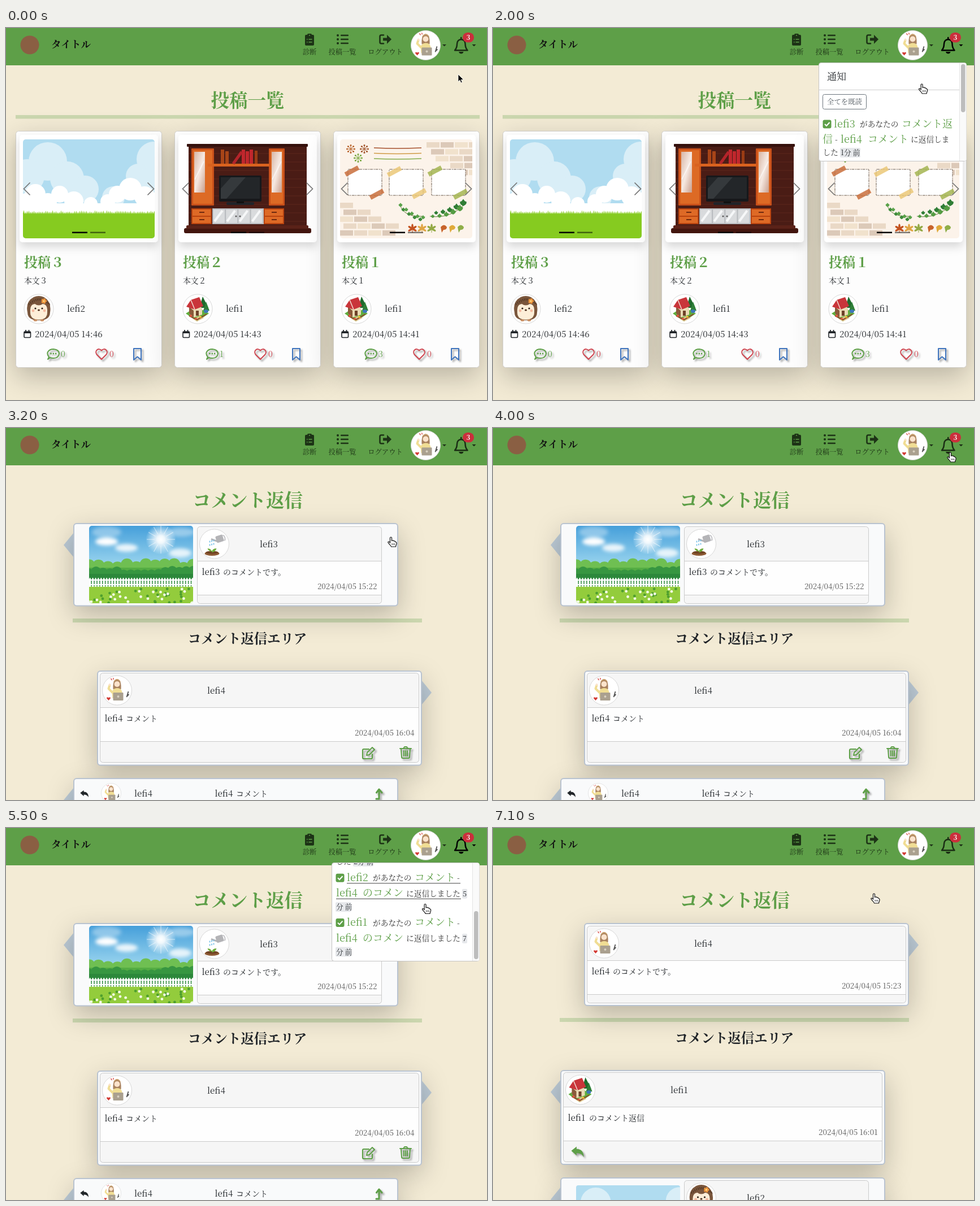
These frames come from a looping animation (851 by 658 pixels, 7.2 s). An HTML page:

```html
<!DOCTYPE html>
<html lang="ja">
<head>
<meta charset="utf-8">
<style>
html, body { margin: 0; width: 100%; height: 100%; overflow: hidden; background: #f3ebd5; }
svg { display: block; width: 100vw; height: 100vh; }
text { font-family: 'Noto Serif CJK JP', 'Noto Serif JP', 'Noto Serif', 'Noto Sans CJK JP', serif; white-space: pre; }
.lift { filter: drop-shadow(0 16px 24px rgba(0,0,0,.24)); }
.float { filter: drop-shadow(0 8px 8px rgba(0,0,0,.15)); }
.icon { filter: drop-shadow(3px 3px 1.5px rgba(0,0,0,.35)); }
</style>
</head>
<body>
<svg id="stage" viewBox="0 0 851 658"></svg>
<script>
const GREEN = '#5e9f48', INK = '#212529', NAV = '#1d3316';
const user = n => 'lefi' + n;

let seed = 7;
const rnd = () => (seed = (seed * 16807) % 2147483647) / 2147483647;
const rep = (n, f) => Array.from({ length: n }, (_, i) => f(i)).join('');

const T = (x, y, s, size, fill = INK, weight = 400, anchor = 'start') =>
  `<text x="${x}" y="${y}" font-size="${size}" fill="${fill}" font-weight="${weight}" text-anchor="${anchor}">${s}</text>`;
const R = (x, y, w, h, fill, r = 0, more = '') =>
  `<rect x="${x}" y="${y}" width="${w}" height="${h}" rx="${r}" fill="${fill}" ${more}/>`;
const E = (x, y, rx, ry, fill, more = '') =>
  `<ellipse cx="${x}" cy="${y}" rx="${rx}" ry="${ry}" fill="${fill}" ${more}/>`;
const C = (x, y, r, fill, more) => E(x, y, r, r, fill, more);
const P = (d, fill, more = '') => `<path d="${d}" fill="${fill}" ${more}/>`;
const L = (d, color, w = 1, more = '') => P(d, 'none', `stroke="${color}" stroke-width="${w}" ${more}`);
const G = (s, more = '') => `<g ${more}>${s}</g>`;
const at = (x, y, s, k = 1) => G(s, `transform="translate(${x} ${y}) scale(${k})"`);
const round = 'stroke-linecap="round" stroke-linejoin="round"';
const clip = (id, x, y, w, h, r) => `<clipPath id="${id}">${R(x, y, w, h, '#000', r)}</clipPath>`;
const stop = (o, c, a = 1) => `<stop offset="${o}" stop-color="${c}" stop-opacity="${a}"/>`;

const defs = `<defs>
${clip('photo', 30, 197, 233, 175, 5)}${clip('paper', 591, 197, 234, 175, 5)}
${clip('garden', 147, 173, 184, 137, 5)}${clip('list', 577, 62, 248, 173, 3)}
<linearGradient id="air" x2="0" y2="1">${stop(0, '#459fda')}${stop(.6, '#a9def2')}</linearGradient>
<linearGradient id="glass" x2="1" y2="1">${stop(0, '#d7b5a5')}${stop(.5, '#f6e9e2')}${stop(1, '#c99f8d')}</linearGradient>
<radialGradient id="sun">${stop(0, '#fff')}${stop(.25, '#fff', .9)}${stop(1, '#fff', 0)}</radialGradient>
<filter id="soft"><feGaussianBlur stdDeviation="3"/></filter></defs>`;

// Avatars, centred on 0,0 with radius 26
const faces = {
  desk: P('M-7-2Q-8-19 0-20Q8-19 7-2Z', '#a9825f') + C(0, -11, 5, '#fbe3cc') +
    P('M-6-14Q0-22 6-14L6-16Q0-24-6-16Z', '#c9a06e') +
    P('M-8 14L-9 2Q-6-4 0-4Q8-4 9 4L9 14Z', '#f0dd94') + L('M-8 4L-15-3L-13-9', '#f0dd94', 4, round) +
    C(-13, -10, 2, '#fbe3cc') + R(-7, 4, 18, 14, '#aaa08f', 1) + C(2, 11, 2, '#d8d0c0') +
    P('M-15 18l-3.5-4q0-3 3.5-1q3.5-2 3.5 1z', '#d33a34') + L('M-11-21l2 3M-7-22l1 3', '#d9534f', 1.4) +
    L('M17 12L20 2M18 10l3-3', '#555', 1.8),
  hedgehog: P('M-20 6Q-24-13-9-21Q0-25 9-21Q23-13 20 6Q20 20 0 20Q-20 20-20 6Z', '#7a563c') +
    rep(13, i => L(`M${-18 + i * 3} ${-11 - 8 * Math.sin(i / 12 * Math.PI)}l1.5 4`, '#4d3423', 1.2)) +
    P('M-15 4Q-16-8-7-9Q0-4 7-9Q16-8 15 4Q16 19 0 19Q-16 19-15 4Z', '#fdeed8') +
    C(-6, -1, 1.6, '#2c1d14') + C(6, -1, 1.6, '#2c1d14') + E(0, 2, 2, 1.5, '#4a2d1c') +
    C(-10, 3, 2.4, '#f4b9a0') + C(10, 3, 2.4, '#f4b9a0') +
    rep(5, i => C(9 + 3 * Math.cos(i * 1.26), -14 + 3 * Math.sin(i * 1.26), 2, '#f0973d')) + C(9, -14, 1.6, '#ffe28a') +
    E(-6, 20, 3.5, 1.8, '#c98f62') + E(6, 20, 3.5, 1.8, '#c98f62'),
  house: P('M-21 8L-2-4L20 8L-1 22Z', '#5fae3c') + P('M-8 18L4 12L11 16L-1 22Z', '#dfc48c') +
    P('M3-2L9-22L19-2Z', '#1f6b2c') + P('M10 3L15-13L21 3Z', '#2f8038') +
    P('M-15-4L-1-12L8-1L8 10L-7 15L-15 8Z', '#eadbb5') + P('M-15-4L-7 3L-7 15L-15 8Z', '#8a5a3a') +
    P('M-20-4L-12-16L3-21L10-5L-5 1Z', '#c9353a') + L('M-12-16L-5 1', '#f0dcd0', 1.5) +
    R(-3, 3, 5, 9, '#6d4128') + L('M-15 12L-1 19L16 9', '#8a4b2a', 2) + E(15, 4, 4, 3, '#3e77b8') +
    C(-12, 12, 2, '#e7523d') + C(5, 14, 1.8, '#f3c52d') + C(-3, 17, 1.8, '#e7523d'),
  can: E(-4, 17, 13, 4, '#8d5a35') + E(-4, 15, 11, 2.5, '#6f4222') +
    P('M-4 15Q-5 8-12 8Q-10 14-4 13Q-3 8 4 8Q2 14-4 15Z', '#6fae3e') +
    G(R(3, -15, 13, 12, '#b4b4b7', 2) + L('M4-6L-5-13', '#b4b4b7', 3) + L('M15-13Q21-13 18-4L15-4', '#c6c6c9', 2), 'transform="rotate(-18 9 -9)"') +
    rep(6, i => E(-8 + i % 3 * 3.5, -4 + (i > 2) * 6 - i % 3, 1, 1.8, '#7cc3e8'))
};
const avatar = (x, y, kind, r = 26) =>
  at(x, y, C(0, 0, 26, '#fff', 'stroke="#d8d8d8"') + faces[kind], r / 26);

// Pictures
const sky = () => G(
  R(30, 197, 233, 175, '#b0dcf0') +
  [[74, 236, 34], [38, 262, 30], [108, 266, 30], [140, 285, 24], [262, 232, 31], [234, 262, 22], [190, 300, 20], [255, 275, 28]]
    .map(c => C(...c, '#d9eef7')).join('') +
  [[35, 310, 18], [52, 294, 18], [74, 308, 16], [95, 294, 15], [120, 306, 17], [150, 311, 12], [180, 307, 13], [197, 294, 15], [220, 285, 20], [245, 298, 18], [262, 305, 14]]
    .map(c => C(...c, '#fff')).join('') +
  R(30, 310, 233, 30, '#fff') +
  P('M30 372V328' + rep(78, i => `L${31.5 + i * 3} ${322 + rnd() * 4}L${33 + i * 3} 329`) + 'V372Z', '#86cb20'),
  'clip-path="url(#photo)"');

const door = (x, w) => R(x, 213, w, 101, '#c9501a', 1) + R(x + 3, 216, w - 6, 95, '#dd6a25') +
  R(x + 5, 219, Math.min(w - 10, 19), 72, 'url(#glass)') + L(`M${x + 6} 268l16-32`, '#fff', 2, 'opacity=".6"');
const drawers = x => R(x, 319, 36, 28, '#b9430f') +
  rep(2, i => R(x + 2, 321 + 13 * i, 32, 11, '#de6a26') + R(x + 14, 325 + 13 * i, 9, 2, '#6d2a10'));
const cabinet = () =>
  R(323, 208, 209, 146, '#4a1c15') + rep(9, i => L(`M323 ${222 + i * 15}H532`, '#5d261c')) +
  R(320, 205, 214, 5, '#35110d', 1) + R(315, 354, 225, 9, '#43160f', 3) + R(319, 349, 216, 6, '#5a2218', 2) +
  door(328, 40) + door(465, 28) + R(357, 240, 109, 5, '#d9621f') +
  [380, 388, 417, 424, 431].map((x, i) => R(x, 215 + i % 2 * 3, 6, 25 - i % 2 * 3, i < 2 ? '#a84518' : '#c1272d')).join('') +
  L('M402 240L417 219', '#b3242a', 5) + R(440, 217, 5, 23, '#9b3c14') +
  R(390, 308, 49, 5, '#20242a', 2) + R(408, 304, 13, 6, '#111') +
  R(377, 261, 75, 46, '#16181b', 2) + R(380, 264, 69, 38, '#232629') + P('M398 264h26l-34 38h-10v-18z', '#35393c') +
  drawers(328) + drawers(456) + R(365, 319, 91, 28, '#b9bcc0') +
  rep(4, i => R(367 + i * 22.2, 321, 20, 24, '#d9dbdd') + L(`M${369 + i * 22.2} 342l14-19`, '#f6f7f8', 4)) +
  C(407, 333, 1.5, '#555') + C(414, 333, 1.5, '#555');

const brick = (x, y, i) => R(x, y, 23, 9.5, ['#ead9c6', '#dcc9b8', '#f1e2cd'][i % 3]);
const tape = (x, y, a, c) => G(R(-13, -4, 26, 8, c), `transform="translate(${x} ${y}) rotate(${a})" opacity=".85"`);
const leaf = (x, y, c, s = 1) => at(x, y, P('M0 6Q-7 3-6-2L-3-3L0-7L3-3L6-2Q7 3 0 6Z', c), s);
const star = (x, y, c) => rep(5, i => G(E(0, -4, 1.8, 4.5, c), `transform="translate(${x} ${y}) rotate(${i * 60 - 120})"`)) + L(`M${x} ${y}v7`, c, 1);
const bloom = (x, y, c) => rep(8, i => {
  const a = i * Math.PI / 4, u = Math.cos(a), v = Math.sin(a);
  return L(`M${x} ${y}l${u * 7} ${v * 7}`, c) + C(x + u * 6.5, y + v * 6.5, 1.5, c);
});
const paper = () => G(
  R(591, 197, 234, 175, '#fcf3ea') +
  rep(5, r => rep(4, i => brick(744 + r * 8 + (r > 2 ? 18 : 0) + i * 25, 202 + r * 12.2, r + i))) +
  rep(5, r => rep(Math.min(r + 1, 4), i => brick(591 + i * 25 + r % 2 * 6, 309 + r * 12.2, r + i * 2))) +
  bloom(610, 214, '#b9662f') + bloom(634, 214, '#a2552c') + bloom(623, 230, '#79a83f') +
  ['#a5502d', '#d09a45', '#85ad4f'].map((c, i) => L(`M651 ${212 + i * 9.5}q40 2 84 0`, c, 1.4)).join('') +
  [605, 678, 753].map(x => R(x, 250, 60, 46, '#fff', 1, 'stroke="#6b5a4c" stroke-dasharray="5 1.5 2 1"')).join('') +
  tape(612, 253, -28, '#c96f3c') + tape(656, 294, -28, '#c96f3c') + tape(687, 254, -28, '#ecc878') +
  tape(731, 293, -28, '#ecc878') + tape(759, 253, -28, '#a5b552') + tape(804, 294, -28, '#a5b552') +
  L('M697 312Q703 335 738 333', '#5d7a35') + L('M750 333Q785 338 810 313', '#5d7a35') +
  rep(9, i => leaf(698 + i * 5, 313 + 22 * Math.sin(i * .19) + i % 2 * 4, i % 2 ? '#3c8a3a' : '#5aa24a', .55)) +
  rep(10, i => leaf(755 + i * 6, 333 - i * i * .22 - i % 2 * 6, i % 2 ? '#2f7d35' : '#549c43', .5 + i * .05)) +
  star(719, 355, '#c4521f') + star(736, 355, '#e0a544') + star(753, 355, '#93a944') +
  ['#c8642b', '#e0aa3a', '#8fae48'].map((c, i) => P(`M${769 + i * 15} 352q6-7 11 0q0 5-6 5l-3 5z`, c)).join(''),
  'clip-path="url(#paper)"');

const hedge = (y, c, r, n) => rep(n, i => C(147 + i * 184 / (n - 1), y + rnd() * 7, r, c));
const garden = () => G(
  R(147, 173, 184, 137, 'url(#air)') +
  G(E(178, 184, 26, 10, '#fff', 'opacity=".35"') + E(178, 201, 20, 7, '#fff') + E(213, 212, 20, 7, '#fff', 'opacity=".85"') +
    E(308, 221, 20, 8, '#fff', 'opacity=".8"') + E(310, 184, 24, 8, '#fff', 'opacity=".4"'), 'filter="url(#soft)"') +
  C(274, 197, 27, 'url(#sun)') + rep(12, i => L('M0-11V-25', '#fff', 1, `opacity=".6" transform="translate(274 197) rotate(${i * 30})"`)) +
  hedge(241, '#6fbf52', 11, 12) + R(147, 247, 184, 30, '#55ad43') + hedge(253, '#379641', 9, 16) + R(147, 258, 184, 25, '#2c883b') +
  R(147, 280, 184, 30, '#93cc3c') + L('M147 269H331M147 277H331', '#fff', 2) +
  rep(38, i => P(`M${147 + i * 4.9} 281v-14l1.7-2.5l1.7 2.5v14z`, '#fff')) +
  rep(50, i => C(147 + rnd() * 184, 284 + rnd() * 26, 2.4, i % 2 ? '#4f9f2e' : '#f4fbe4')),
  'clip-path="url(#garden)"');

// Icons
const replyIcon = (x, y, c, k) => at(x, y, P('M-11-2L-2-9V-5Q10-5 10 9Q7 2-2 2V6Z', c), k);
const editIcon = (x, y) => G(
  L(`M${x + 1} ${y - 7}h-9q-2 0-2 2v13q0 2 2 2h13q2 0 2-2v-6`, GREEN, 2.2, round) +
  L(`M${x - 3} ${y + 4}l1-5l9-9l4 4l-9 9z`, GREEN, 2, round), 'class="icon"');
const trashIcon = (x, y) => G(
  L(`M${x - 10} ${y - 7}h20M${x - 4} ${y - 7}l2-3h4l2 3M${x - 8} ${y - 6}l1 14q0 2 2 2h10q2 0 2-2l1-14M${x - 3} ${y - 3}v9M${x} ${y - 3}v9M${x + 3} ${y - 3}v9`, GREEN, 2, round), 'class="icon"');
const chevron = (x, dir) => L(`M${x} 273.5l${dir * 11} 11l${-dir * 11} 11`, '#777', 1.7);

const heading = s => T(427.5, 140, s, 32.5, GREEN, 600, 'middle');
const BAR = 'rgba(94,159,72,.27)';

const card = (i, no, who, face, time, replies) => at(281 * i, 0,
  R(17.5, 182.5, 258, 418, '#fdfdfd', 5, 'class="lift"') + R(17.5, 182.5, 258, 418, '#fdfdfd', 5, 'stroke="#cfcdc8"') +
  R(24, 189, 245, 190, '#fff', 5, 'class="float"') +
  T(32, 423, '投稿' + no, 23.6, GREEN, 600) + T(32, 452, '本文' + no, 13.8, INK, 500) +
  avatar(58, 497, face) + T(108, 502, user(who), 15.2) +
  R(32, 537, 11.5, 10.5, 'none', 1.5, `stroke="${INK}" stroke-width="1.6"`) + R(32, 537, 11.5, 3, INK) + L('M35 534v3M40.500 534v3', INK, 1.8) +
  T(51, 546.5, '2024/04/05 14:' + time, 15.2) +
  G(L('M76 582Q72 577 74 573Q77 568 84 568Q94 569 94 576Q93 584 84 584Q80 584 78 583L74 586Z', GREEN, 2, round) +
    rep(3, k => C(79.5 + k * 4.3, 576, 1.4, GREEN)) + T(97, 581.5, replies, 14, GREEN) +
    L('M169 586L160.500 577.500C156 571 164 564.500 169 570.500C174 564.500 182 571 177.500 577.500Z', '#cf4650', 2, round) + T(183, 581.5, 0, 14, '#cf4650') +
    L('M226 567h13v20l-6.500-5.500l-6.500 5.500z', '#3f74bd', 2, round), 'class="icon"'));

const listPage = () => heading('投稿一覧') + R(17, 154, 821, 6.5, BAR) +
  card(0, '３', 2, 'hedgehog', 46, 0) + card(1, '２', 1, 'house', 43, 1) + card(2, '１', 1, 'house', 41, 3) +
  sky() + cabinet() + paper() +
  rep(3, i => at(281 * i, 0, chevron(42.5, -1) + chevron(250.5, 1) + R(117, 360.5, 27, 2.5, '#000') + R(149, 360.5, 27, 2.5, '#000', 0, 'opacity=".5"')));

const box = (x, y, h, side) => {
  const edge = side < 0 ? x : x + 573;
  const rect = more => R(x, y, 573, h, '#f9fafb', 5, more);
  return P(`M${edge + side * 18} ${y + 38}L${edge} ${y + 16}V${y + 60}Z`, '#bccad5') +
    rect('class="lift"') + rect('stroke="#b9c3d0" stroke-width="2"');
};
const say = (x, y, who, s) => T(x, y, user(who), 15.2, INK, 500) + T(x + 37.5, y, s, 14, INK, 500);
const note = (x, y, w, h, face, who, nameX, s, date) =>
  R(x, y, w, h, '#f6f6f6', 5, 'stroke="#cbcbcb"') + R(x, y + 61, w, 60, '#fefefe', 0, 'stroke="#cbcbcb"') +
  avatar(x + 30, y + 30.5, face) + T(nameX, y + 36.5, user(who), 15.2) + say(x + 8, y + 85, who, s) +
  T(x + w - 8, y + 110, '2024/04/05 ' + date, 13.4, '#555', 400, 'end');
const replyTop = dy => heading('コメント返信') + R(118, 337 + dy, 618, 7, BAR) +
  T(427, 381 + dy, 'コメント返信エリア', 23.4, INK, 600, 'middle');

const replyPage = () => replyTop(0) +
  box(120, 169, 145.5, -1) + garden() + note(338.5, 174.5, 326, 136, 'can', 3, 449, 'のコメントです。', '15:22') +
  box(162, 430, 166.5, 1) + note(166.5, 433.5, 564, 158, 'desk', 4, 356, 'コメント', '16:04') +
  editIcon(641, 575) + trashIcon(707, 574) +
  box(120, 620, 120, -1) + replyIcon(139, 647, INK, .7) + avatar(186, 646, 'desk', 17.5) +
  T(227, 652, user(4), 15.2) + say(369.5, 652, 4, 'コメント') +
  G(L('M655 656h5v-16M655.500 645l4.500-6l5 6', GREEN, 3, round), 'class="icon"');

const otherPage = () => replyTop(-1) +
  box(162, 169, 145, 1) + note(166.5, 173.5, 564, 136, 'desk', 4, 356, 'のコメントです。', '15:23') +
  box(120, 429, 166, -1) + note(124.5, 432.5, 564, 158, 'house', 1, 314, 'のコメント返信', '16:01') +
  G(replyIcon(150, 573, GREEN, 1.05), 'class="icon"') +
  box(120, 619, 120, -1) + G(sky(), 'transform="translate(147 632) scale(.79) translate(-30 -197)"') +
  note(338.5, 623.5, 326, 136, 'hedgehog', 2, 449, 'コメント', '15:20');

const header = () => R(0, 0, 851, 66, GREEN) + C(42, 30, 16.5, '#8a5f43') + T(80, 34.5, 'タイトル', 17.6, '#111', 700) +
  R(529, 12, 16, 19, NAV, 2) + R(533, 10, 8, 5, NAV, 2) + C(537, 13, 1, GREEN) + L('M532 20h1.500M535.500 20h6M532 25h1.500M535.500 25h6', GREEN, 1.4) +
  rep(3, i => C(587, 13 + i * 7, 2, NAV) + R(592, 11.7 + i * 7, 14, 2.6, NAV, 1)) +
  L('M668 12.500h-4q-2.500 0-2.500 2.500v10q0 2.500 2.500 2.500h4', NAV, 2.6, round) + P('M667 17.500h7v-5.500l8 8l-8 8v-5.500h-7z', NAV) +
  T(537, 47, '診断', 12.3, NAV, 500, 'middle') + T(595, 47, '投稿一覧', 12.3, NAV, 500, 'middle') + T(671, 47, 'ログアウト', 12.3, NAV, 500, 'middle') +
  avatar(742.5, 30.5, 'desk') + P('M772 29h7l-3.500 3.500z', NAV) +
  G(L('M794 39.500Q798 35 798 28C798 17.500 812.500 17.500 812.500 28Q812.500 35 816.500 39.500ZM805.200 17v3', '#000', 2.5, round) +
    P('M801 42h8.500q-1 3.500-4.200 3.500t-4.300-3.500z', '#000') + P('M824.500 29h7l-3.500 3.500z', '#000'), 'id="bell"') +
  R(808, 8, 20, 17.5, '#cb2f3c', 8.7) + T(818, 21, 3, 11.5, '#fff', 700, 'middle');

// Notification list
const big = (x, y, s) => T(x, y, s, 18, GREEN, 500);
const small = (x, y, s) => T(x, y, s, 13.7, '#333');
const item = (i, who, lines, under) => at(0, i * 79.3,
  R(583.5, 162.5, 15, 15, GREEN, 3) + L('M587 170l3 3l5.500-6', '#fff', 2) +
  big(603, 175.5, user(who)) + small(649, 175, 'があなたの') + lines +
  G(L(under, '#444', 1), `id="under${i}"`));
const ago = (x, y, w, s) => R(x - 1, y - 13, w, 17, '#e6e8eb', 2) + T(x, y, s, 12.6, INK, 500);
const shortItem = (i, who, min) => item(i, who,
  big(723, 175.5, 'コメント') + small(798, 175, '-') + big(584, 203, user(4)) + big(631, 203, 'のコメン') +
  small(708, 202.5, 'に返信しました') + ago(808, 202.5, 9, min) + ago(584, 226, 28, '分 前'), 'M603 179.500H804M584 207H805');
const panel = () => R(576.5, 61.5, 261, 174, '#fff', 4, 'stroke="#c4c4c4"') + G(G(
  T(591, 91.5, '通知', 17, INK, 500) + L('M576 109.500H825', '#cfcfcf') +
  R(583.5, 117.5, 77, 26, '#fff', 3, 'stroke="#6c757d"') + T(591, 135, '全てを既読', 12.4, '#4d555c') +
  item(0, 3, big(723, 175.5, 'コメント返') + big(583, 202.5, '信') + small(605, 202, '-') + big(615, 202.5, user(4)) +
    big(663, 202.5, 'コメント') + small(739, 202, 'に返信しま') + small(583.5, 225, 'した') +
    ago(615, 225, 36, '<tspan id="mins">1</tspan>分 前'), 'M603 179.500H813M584 206.500H808M584 229.500H611') +
  shortItem(1, 2, 5) + shortItem(2, 1, 7), 'id="scroll"'), 'clip-path="url(#list)"') +
  R(825, 62, 12.5, 173, '#fafafa', 3) + L('M825.500 62V235', '#e4e4e4') + `<rect id="thumb" x="828" width="7.500" height="85" rx="3.700" fill="#bdbdbd"/>`;

const arrow = P('M0 0v13l3-2.800l2 4.800l2.200-1l-2-4.600h4.200z', '#000', 'stroke="#fff" stroke-width=".8"');
const hand = P('M-1.500 1.500c0-2 3-2 3 0v5l1.500-.5c1.500-.5 2 .5 2.300 1c2-.3 2.500.7 2.700 1.500c1.700 0 2 1 2 2.500c0 3-1.500 3.500-1.500 6h-8c-.5-2.500-4-4.500-5.500-7.500c-.6-1.600 1.500-2.200 3.500.3z', '#fff', 'stroke="#111" stroke-width="1.200"') +
  L('M2 11v3M4.300 11v3M6.600 11v3', '#111', .8);

document.getElementById('stage').innerHTML = defs + R(0, 0, 851, 658, '#f3ebd5') +
  G(listPage(), 'id="page0"') + G(replyPage(), 'id="page1"') + G(otherPage(), 'id="page2"') +
  header() + G(panel(), 'id="panel"') + G(G(arrow, 'id="arrow"') + G(hand, 'id="hand"'), 'id="cursor"');

const LOOP = 7200, STEP = 100;
const moves = [[0, 800, 82], [700, 800, 82], [1200, 808, 36], [1700, 809, 38], [2400, 681, 193], [3300, 681, 193],
  [3900, 809, 43], [4300, 809, 43], [4700, 747, 136], [5400, 747, 136], [6000, 674, 116], [7200, 674, 116]];
const scrolls = [[0, 0], [4500, 0], [4900, 91], [5300, 161], [7200, 161]];
const smooth = u => u * u * (3 - 2 * u);

function track(keys, t, ease = u => u) {
  const i = keys.findIndex(k => k[0] > t), a = keys[i - 1], b = keys[i];
  const u = ease((t - a[0]) / (b[0] - a[0]));
  return a.slice(1).map((v, k) => v + (b[k + 1] - v) * u);
}

const $ = id => document.getElementById(id);
const show = (id, on) => { $(id).style.display = on ? '' : 'none'; };

function draw(t) {
  const page = t < 3100 ? 0 : t < 6400 ? 1 : 2;
  const open = (t >= 1600 && t < 3100) || (t >= 4200 && t < 6400);
  const [x, y] = track(moves, t, smooth), [s] = track(scrolls, t);
  for (let i = 0; i < 3; i++) {
    show('page' + i, i === page);
    show('under' + i, x < 825 && y > 62 && Math.floor((y + s - 157) / 79.3) === i);
  }
  show('panel', open);
  $('mins').textContent = page ? 2 : 1;
  $('scroll').setAttribute('transform', `translate(0 ${-s})`);
  $('thumb').setAttribute('y', 64 + s * 83 / 161);
  const hover = (t >= 1200 && t < 1600) || (t > 4000 && t < 4200);
  $('bell').setAttribute('opacity', open || hover ? 1 : .72);
  show('arrow', t < 1400);
  show('hand', t >= 1400);
  $('cursor').setAttribute('transform', `translate(${x} ${y})`);
}

const start = performance.now();
let last = -1;
function tick() {
  const t = Math.floor((performance.now() - start) % LOOP / STEP) * STEP;
  if (t !== last) draw(last = t);
  requestAnimationFrame(tick);
}
tick();
</script>
</body>
</html>
```
